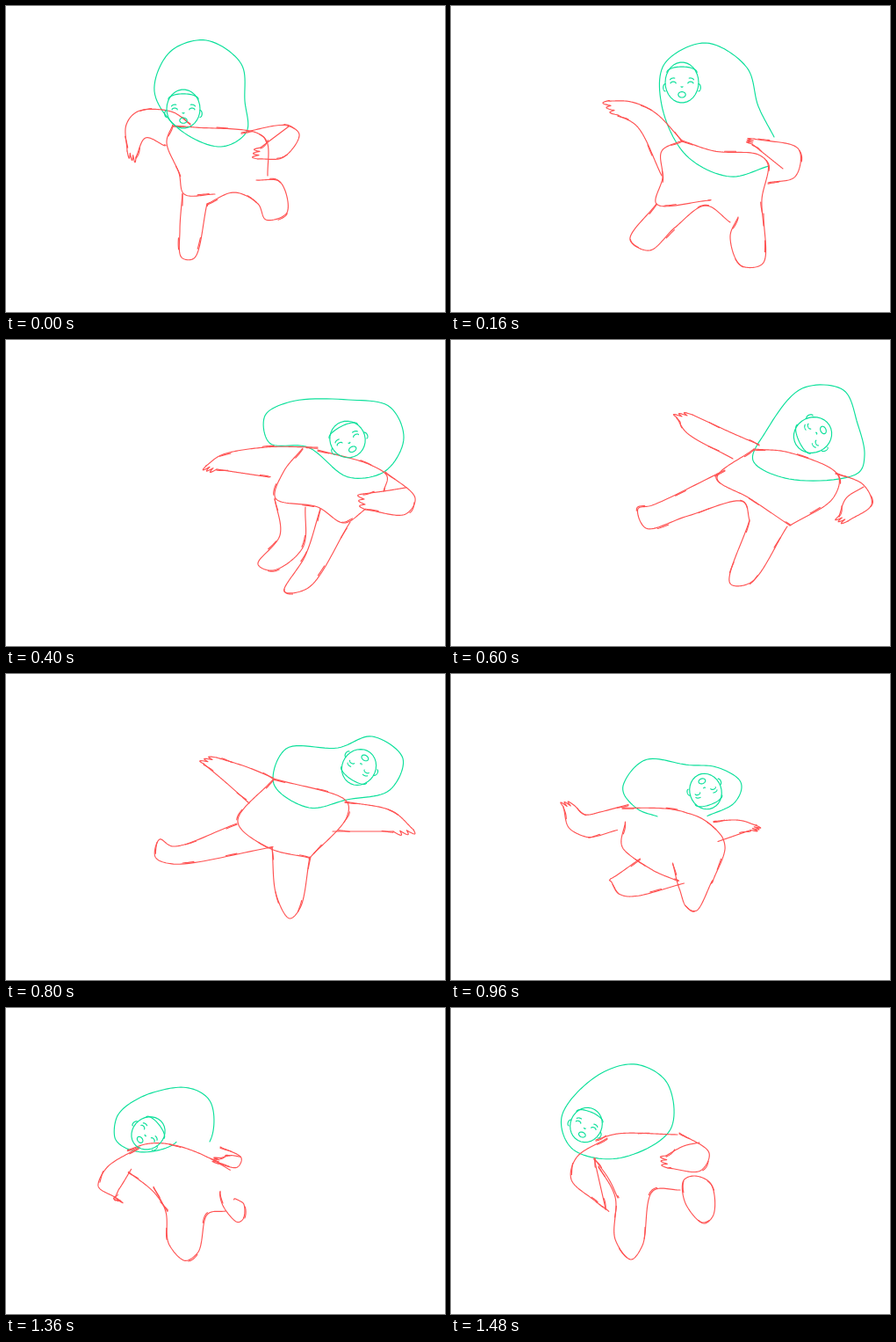
Write an HTML page with a canvas that moves like this. It is 500 px wide and 348 px high and loops after 1600 ms.

```html
<!DOCTYPE html>
<html lang="en">
<head>
<meta charset="utf-8">
<title>Tumbling dancer</title>
<style>
html, body { margin: 0; width: 100%; height: 100%; overflow: hidden; background: #fff; }
canvas { display: block; }
</style>
</head>
<body>
<canvas id="stage" width="500" height="348"></canvas>
<script>
const ctx = document.getElementById('stage').getContext('2d');
const GREEN = '#0be09a', RED = '#ff5252';
const LOOP = 1600, SAMPLES = 96;
const starts = [0, 80, 160, 280, 400, 480, 600, 720, 800, 880, 960, 1040, 1120, 1240, 1360, 1480];
const poses = [];

const mix = (a, b, k) => a + (b - a) * k;
const blend = (p, q, k) => p.map((v, i) => mix(v, q[i], k));

// Centripetal spline, sampled evenly so that strokes of any length can be blended.
function curve(text) {
  const closed = text.endsWith('z');
  const n = text.replace('z', '').trim().split(' ').map(Number), pts = [];
  for (let i = 0; i < n.length; i += 2) pts.push([n[i], n[i + 1]]);
  const count = pts.length, spans = closed ? count : count - 1;
  const at = i => closed ? pts[(i + count) % count]
    : i < 0 ? blend(pts[1], pts[0], 2)
    : i >= count ? blend(pts[count - 2], pts[count - 1], 2) : pts[i];
  const gap = (p, q) => Math.sqrt(Math.hypot(p[0] - q[0], p[1] - q[1]));
  return Array.from({ length: SAMPLES + 1 }, (_, s) => {
    const u = s / SAMPLES * spans, i = Math.min(spans - 1, Math.floor(u));
    const [a, b, c, d] = [at(i - 1), at(i), at(i + 1), at(i + 2)];
    const tb = gap(a, b), tc = tb + gap(b, c), td = tc + gap(c, d), t = mix(tb, tc, u - i);
    const ab = blend(a, b, t / tb), bc = blend(b, c, u - i), cd = blend(c, d, (t - tc) / (td - tc));
    return blend(blend(ab, bc, t / tc), blend(bc, cd, (t - tb) / (td - tb)), u - i);
  });
}

// face: centre x, centre y, turn in degrees, half width, half height
function pose(drawing, face, strokes) {
  const lines = {};
  for (const name in strokes) lines[name] = curve(strokes[name]);
  poses.push({ drawing, face, lines });
}

pose(0, [202, 117, 0, 19, 22], {
  head: '274 143 245 160 196 139 169 97 187 52 228 39 268 66 272 108 z',
  armL: '210 134 188 120 150 120 137 135 138 165',
  underL: '148 172 159 150 181 159',
  back: '190 136 215 138 285 144 297 154 298 193',
  torso: '190 135 183 155 197 190 203 214 238 214',
  armR: '268 144 320 136 334 146 316 172 287 174',
  underR: '290 161 322 137',
  legL: '201 213 198 255 200 286 214 287 229 225',
  legR: '229 225 260 212 287 225 296 243 320 235 312 200 285 198'
});

pose(2, [263, 87, 0, 19, 23], {
  head: '362 182 318 194 268 170 240 113 243 66 290 42 337 70 350 114 368 149',
  armL: '263 153 232 121 205 109 178 108',
  underL: '190 124 212 137 240 193',
  back: '263 153 300 165 350 169 361 180 354 220 356 250',
  torso: '263 153 240 165 241 195 234 225 295 221',
  armR: '361 201 392 194 396 163 345 151',
  underR: '343 157 378 185',
  legL: '234 225 204 266 226 278 255 252 290 227 318 246',
  legR: '327 240 318 262 330 295 355 293 356 236'
});

pose(4, [389, 113, -27, 20, 21], {
  head: '432 149 390 156 344 122 300 117 295 86 325 70 390 68 437 76 453 112 z',
  armL: '355 122 295 122 245 131 228 143',
  underL: '240 147 300 156',
  back: '355 125 415 142 434 155 430 172',
  torso: '338 123 316 150 307 180 355 190 385 208 410 192',
  armR: '432 150 466 180 455 198 410 193',
  underR: '407 175 430 172 455 168',
  legL: '306 180 312 222 287 255 304 262 338 236 341 190',
  legR: '358 192 341 245 317 286 344 282 392 207'
});

pose(6, [412, 108, -115, 20, 22], {
  head: '464 151 385 158 344 137 358 105 400 55 447 57 463 95 471 131 z',
  armL: '351 119 325 108 275 85',
  underL: '257 88 268 105 321 135',
  back: '345 124 385 128 441 154 435 180 386 211',
  torso: '345 124 303 157 340 180 386 211',
  armR: '438 151 470 165 479 187 452 206',
  underR: '442 200 450 180 470 167',
  legL: '312 148 229 188 213 192 222 214 270 200 333 184 340 205',
  legR: '340 205 318 277 341 276 383 212'
});

pose(8, [402, 106, -147, 19, 21], {
  head: '388 143 345 152 305 125 319 85 378 84 417 71 452 96 437 132 z',
  armL: '304 118 275 106 240 95',
  underL: '225 102 250 123 277 147',
  back: '305 119 388 145 388 163 345 210',
  torso: '305 119 264 168 300 198 345 209',
  armR: '386 145 440 156 464 177',
  underR: '441 179 372 179',
  legL: '263 170 190 196 175 188 170 208 190 216 303 197',
  legR: '303 197 308 252 323 278 335 266 346 208'
});

pose(12, [178, 161, -252, 17, 20], {
  head: '82 181 79 138 127 111 175 137 211 151 196 180',
  armL: '100 179 60 203 41 217 41 204',
  underL: '31 200 28 235 50 240 102 208',
  back: '85 185 130 171 190 181 243 223 250 265',
  torso: '92 217 145 238 172 262',
  armR: '212 190 218 177 230 167',
  underR: '242 176 236 202',
  legL: '168 250 176 274 202 290 227 291 228 279',
  legR: '202 233 212 236 212 250 225 272 249 262'
});

pose(15, [154, 133, -337, 18, 20], {
  head: '250 138 190 171 138 160 126 124 165 78 210 64 246 85 z',
  armL: '178 148 143 170 137 195 166 221',
  underL: '176 228 163 171',
  back: '165 150 190 143 258 144',
  torso: '163 171 180 195 190 216',
  armR: '260 142 294 165 284 185 247 182',
  underR: '245 168 265 157 283 153',
  legL: '168 180 187 215 187 263 205 286 218 270 230 208 261 207',
  legR: '265 196 267 222 288 245 299 235 296 200 278 191 z'
});

function stroke(points, color) {
  ctx.strokeStyle = color;
  ctx.beginPath();
  for (const [x, y] of points) ctx.lineTo(x, y);
  ctx.stroke();
}

// A pencil line with short, slightly displaced retraced parts.
function sketch(points) {
  stroke(points, RED);
  ctx.setLineDash([13, 37]);
  stroke(points.map(([x, y], i) => [x + 1.2 * Math.sin(i / 7), y + 1.1 * Math.cos(i / 9)]), RED);
  ctx.setLineDash([]);
}

// Three fingers between the ends of the two arm edges.
function drawHand(arm, under) {
  const tip = arm[SAMPLES], before = arm[SAMPLES - 4];
  const dx = tip[0] - before[0], dy = tip[1] - before[1], reach = 7 / Math.hypot(dx, dy);
  stroke(Array.from({ length: 25 }, (_, i) => {
    const [x, y] = blend(tip, under[0], i / 24), r = reach * Math.abs(Math.sin(i * Math.PI / 8));
    return [x + dx * r, y + dy * r];
  }), RED);
}

function drawFace([x, y, turn, w, h]) {
  const a = turn * Math.PI / 180, c = Math.cos(a), s = Math.sin(a);
  const arc = (cx, cy, rx, ry, from = 0, to = 2) => stroke(Array.from({ length: 31 }, (_, i) => {
    const angle = mix(from, to, i / 30) * Math.PI;
    const u = (cx + rx * Math.cos(angle)) * w, v = (cy + ry * Math.sin(angle)) * h;
    return [x + u * c - v * s, y + u * s + v * c];
  }), GREEN);
  arc(0, 0, 1, 1);
  arc(0, -.5, .9, .28, 1, 2);
  arc(0, .6, .22, .14);
  arc(0, .2, .05, .03, 0, 1);
  for (const side of [-1, 1]) {
    arc(side, .25, .12, .18, side < 0 ? .5 : -.5, side < 0 ? 1.5 : .5);
    arc(side * .52, .04, .16, .08, 1, 2);
    arc(side * .5, -.1, .22, .12, side < 0 ? 1.1 : 1.4, side < 0 ? 1.6 : 1.9);
  }
}

function draw(drawing) {
  const n = poses.findLastIndex(p => p.drawing <= drawing);
  const from = poses[n], to = poses[n + 1] || from;
  const k = from === to ? 0 : (drawing - from.drawing) / (to.drawing - from.drawing);
  ctx.fillStyle = '#fff';
  ctx.fillRect(0, 0, 500, 348);
  ctx.lineWidth = 1.15;
  ctx.lineCap = ctx.lineJoin = 'round';
  const lines = {};
  for (const name in from.lines) {
    lines[name] = from.lines[name].map((p, i) => blend(p, to.lines[name][i], k));
    if (name === 'head') stroke(lines.head, GREEN);
    else sketch(lines[name]);
  }
  drawHand(lines.armL, lines.underL);
  drawHand(lines.armR, lines.underR);
  drawFace(blend(from.face, to.face, k));
}

function tick() {
  const t = performance.now() % LOOP;
  draw(starts.findLastIndex(s => s <= t));
  requestAnimationFrame(tick);
}
tick();
</script>
</body>
</html>
```
